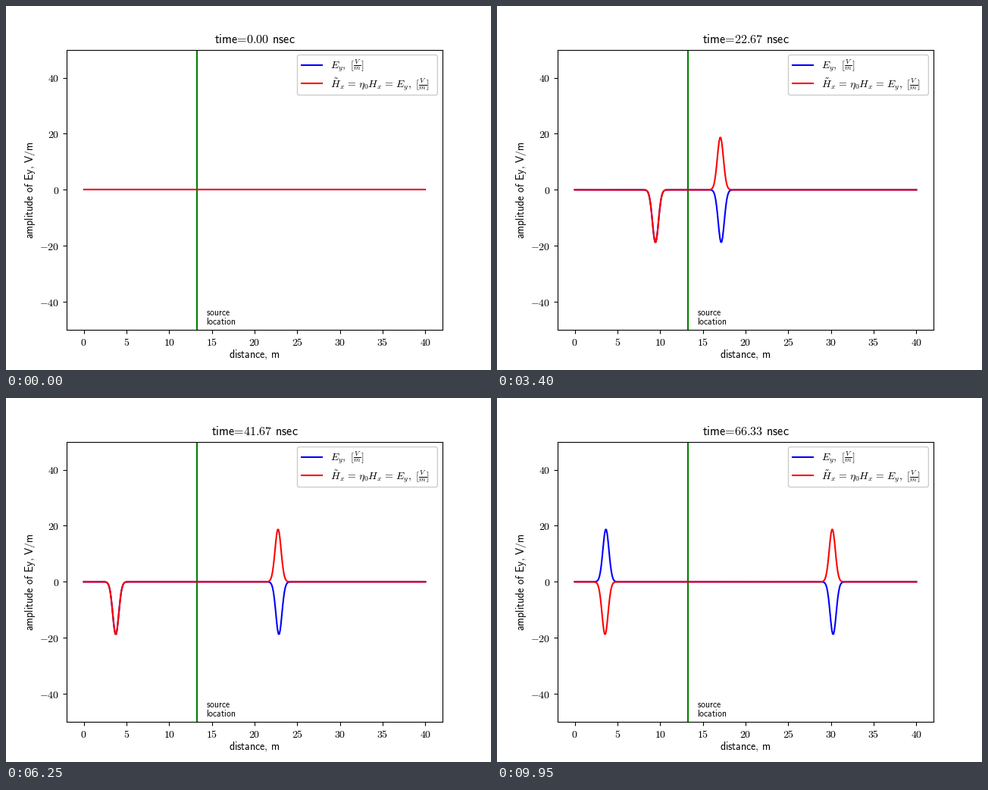
A matplotlib script for the animation above (10 s loop, 640x480 px).

```python
import numpy as np
import matplotlib.pyplot as plt
from matplotlib.animation import FuncAnimation
from matplotlib.patches import FancyBboxPatch

plt.rcParams["mathtext.fontset"] = "cm"

W, H, DPI = 640, 480, 100
FRAMES, INTERVAL = 200, 50
DT = 1 / 3                    # ns per step
DZ = 0.1                      # m per cell
CELLS, SOURCE = 401, 133
AMP = 0.5 * 376.73 * DZ       # field of a unit current sheet
DELAY, WIDTH = 30, 5          # pulse timing in steps

cell = np.arange(CELLS)
z = cell * DZ


def sans(text):
    """Set plain text in the Computer Modern sans face."""
    for old, new in ((",", "{,}"),
                     ("=", r"\hspace{-0.2}=\hspace{-0.2}"),
                     (" ", r"\hspace{0.38}")):
        text = text.replace(old, new)
    return r"$\mathsf{%s}$" % text


def pulse(step):
    return AMP * np.exp(-((step - DELAY) / WIDTH) ** 2)


def fields(n):
    """E and normalised H after n steps, with a perfect mirror at z = 0."""
    t = n + 0.5
    left = cell < SOURCE
    outward = pulse(t + cell - SOURCE)
    e = np.where(left,
                 -outward + pulse(t - cell - SOURCE),
                 -pulse(t - cell + SOURCE))
    h = np.where(left,
                 -outward - pulse(t - 1 - cell - SOURCE),
                 pulse(t - 1 - cell + SOURCE))
    return e, h


def title_text(n):
    return sans(f"time={n * DT:.2f} nsec")


fig, ax = plt.subplots(figsize=(W / DPI, H / DPI), dpi=DPI)
ax.set_position([0.125, 0.11, 0.775, 0.77])
ax.set(xlim=(-2, 42), ylim=(-50, 50),
       xticks=range(0, 41, 5), yticks=range(-40, 41, 20))
for axis in (ax.xaxis, ax.yaxis):
    axis.set_major_formatter(lambda v, pos: f"${v:.0f}$")

ax.axvline(SOURCE * DZ, color="g", lw=1.5, zorder=1.5)
e_line, = ax.plot(z, 0 * z, color="b", lw=1.5)
h_line, = ax.plot(z, 0 * z, color="r", lw=1.5)
title = ax.set_title(title_text(0), fontsize=11.65)

# Labels and legend sit on an overlay measured in pixels.
over = fig.add_axes([0, 0, 1, 1])
over.set(xlim=(0, W), ylim=(H, 0))
over.axis("off")


def label(x, y, text, size=10, **kw):
    over.text(x, y, text, fontsize=size, va="baseline", **kw)


label(328, 464, sans("distance, m"), ha="center")
label(36, 242.4, sans("amplitude of Ey, V/m"), ha="center",
      rotation=90, rotation_mode="anchor")
label(263.8, 408, sans("source"), 8.4)
label(263.8, 419.8, sans("location"), 8.4)

over.add_patch(FancyBboxPatch(
    (384.5, 64.5), 184.9, 53, boxstyle="round,pad=0,rounding_size=2.8",
    fc="white", ec="0.8", lw=1))
e_name = r"E_y,\ [\frac{V}{m}]"
eq = r"\hspace{0.12}=\hspace{0.12}"
h_name = r"\tilde{H}_x" + eq + r"\eta_0 H_x" + eq + e_name
for y, color, name in ((77.5, "b", e_name), (102, "r", h_name)):
    over.plot([389.6, 417.4], [y, y], color=color, lw=1.5)
    label(428, y + 5.2, f"${name}$")


def update(n):
    e, h = fields(n)
    e_line.set_ydata(e)
    h_line.set_ydata(h)
    title.set_text(title_text(n))
    return e_line, h_line, title


anim = FuncAnimation(fig, update, frames=FRAMES, interval=INTERVAL,
                     repeat=True, repeat_delay=0, blit=False)
plt.show()
```
